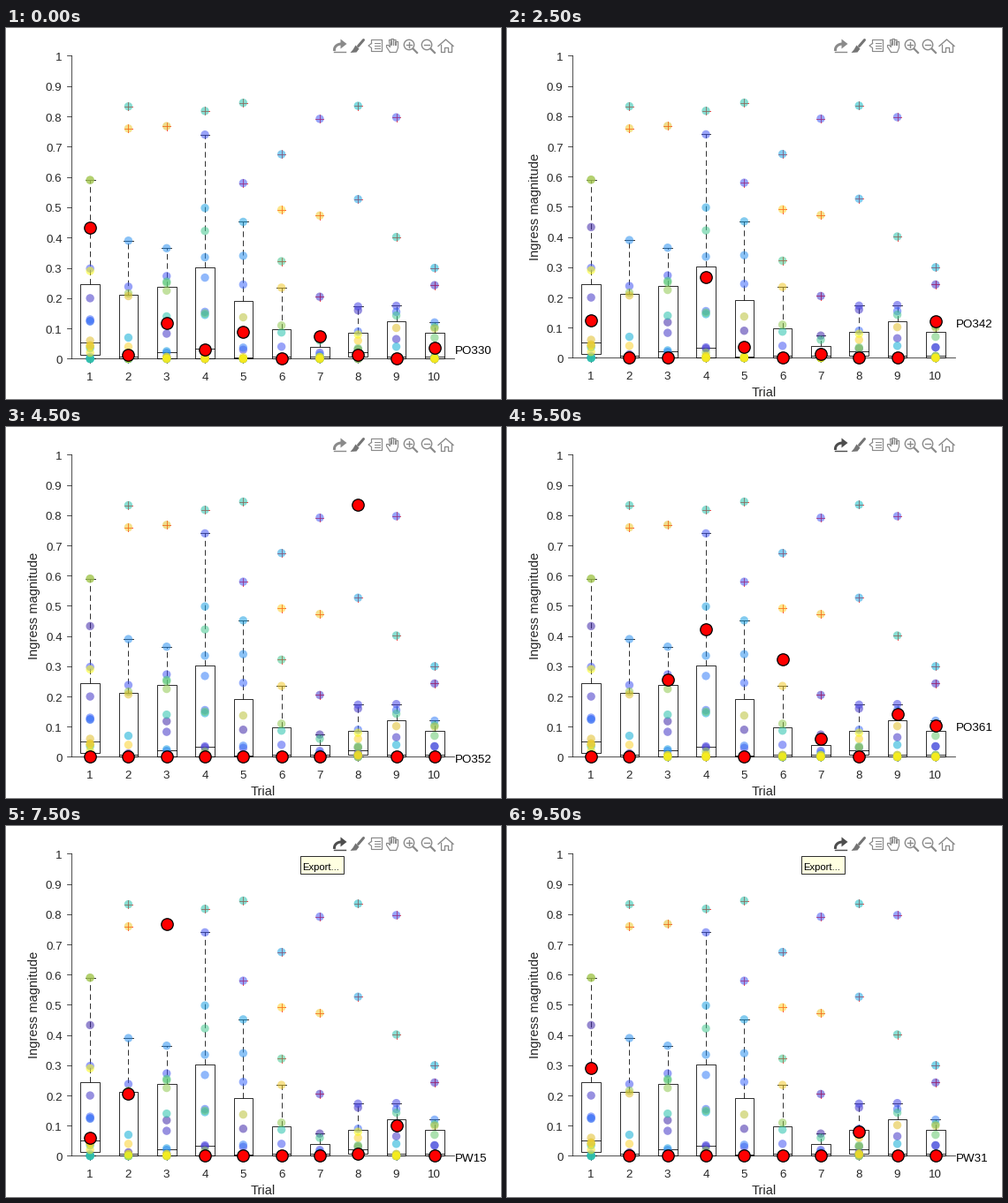
A matplotlib script for the animation above (10000 ms loop, 560 by 420 pixels).

```python
import numpy as np
import matplotlib.pyplot as plt
from matplotlib.animation import FuncAnimation
from matplotlib.colors import LinearSegmentedColormap
from matplotlib.patches import Circle, Polygon, Rectangle

plt.rcParams["font.family"] = "Liberation Sans"

W, H = 560, 420
LEFT, RIGHT, TOP = 73, 506, 31
STEP = (RIGHT - LEFT) / 10
INK = "#262626"
PARULA = LinearSegmentedColormap.from_list("parula", [
    "#3e26a8", "#4747eb", "#3e6fff", "#2797eb", "#08b5d0",
    "#31c69f", "#81cc59", "#dcbd29", "#fccf30", "#f9fb15"])

PEOPLE = ["PO330", "PO332", "PO336", "PO340", "PO341", "PO342", "PO344",
          "PO346", "PO349", "PO352", "PO358", "PO361", "PO368", "PO374",
          "PW12", "PW15", "PW18", "PW22", "PW27", "PW31"]
COUNT = len(PEOPLE)
COLORS = PARULA(np.linspace(0, 1, COUNT))

# Per trial: first participant of a run -> consecutive magnitudes.
RUNS = [
    {0: [.433, .2, .125, .298, .13, .123],
     10: [.035, 0, .59, .042, .59, .06, .045, .04, .02, .29]},
    {0: .012, 3: .238, 6: .39, 8: .07, 10: .833, 13: .216, 15: [.207, .76, .04]},
    {0: [.118, .083], 3: [.273, .02], 6: [.365, .025],
     10: [.14, .255, .25, .225], 15: .768},
    {0: .031, 2: [.035, .74, .155, .268, .335, .498, .145],
     10: [.818, .422, .15, .018]},
    {0: .09, 2: [.03, .58, .245, .037, .34, .452], 10: .845, 14: .137},
    {3: .04, 7: .675, 10: [.087, .322], 13: .11, 16: [.235, .492]},
    {0: [.074, .205, .02, .792], 5: .013, 11: .06, 16: .473},
    {0: [.012, .16, .173, .031, .09], 7: .527, 9: .835, 12: [.035, .031],
     15: .008, 17: .06, 19: .08},
    {1: [.065, .175, .797, .155], 8: .04, 10: [.402, .143], 15: .102},
    {0: [.035, .243], 3: .035, 5: .12, 8: .3, 11: [.105, .07], 14: .1},
]


def expand(runs):
    values = np.where(np.arange(COUNT) % 4 == 2, .006, 0)
    for start, run in runs.items():
        run = np.atleast_1d(run)
        values[start:start + len(run)] = run
    return values


DATA = [expand(runs) for runs in RUNS]
CENTERS = [LEFT + STEP * (i + .5) for i in range(10)]

fig = plt.figure(figsize=(W / 72, H / 72), dpi=72, facecolor="white")
ax = fig.add_axes([0, 0, 1, 1])


def line(xs, ys, color="black", width=.8, z=2, **kw):
    ax.plot(xs, ys, color=color, lw=width, zorder=z, **kw)


def text(x, y, s, size=13.33, color=INK, **kw):
    """Place text with its capitals centred on y."""
    ax.text(x, y + .36 * size, s, size=size, color=color, va="baseline", zorder=6, **kw)


def draw_axes(base):
    line([LEFT, LEFT], [TOP, base], INK)
    line([LEFT, RIGHT], [base, base], INK)
    for i in range(11):
        y = base + (TOP - base) * i / 10
        line([LEFT - 4.5, LEFT], [y, y], INK)
        text(63, y + .7, f"{i / 10:g}", ha="right")
    for i, x in enumerate(CENTERS, 1):
        line([x, x], [base, base + 4.5], INK)
        text(x, base + 19.5, str(i), ha="center")


def draw_box(x, values, to_y):
    q1, median, q3 = np.percentile(values, [25, 50, 75], method="hazen")
    reach = 1.5 * (q3 - q1)
    inside = values[(values >= q1 - reach) & (values <= q3 + reach)]
    half = STEP / 4
    ax.add_patch(Rectangle((x - half, to_y(q3)), 2 * half, to_y(q1) - to_y(q3),
                           fill=False, ec="black", lw=.8, zorder=2))
    line([x - half, x + half], [to_y(median)] * 2)
    for quartile, end in ((q1, inside.min()), (q3, inside.max())):
        line([x, x], [to_y(quartile), to_y(end)], ls=(0, (8, 5)), dash_capstyle="butt")
        line([x - half / 2, x + half / 2], [to_y(end)] * 2)
    for v in values[values > q3 + reach]:
        y = to_y(v)
        line([x - 4.5, x + 4.5], [y, y], "red")
        line([x, x], [y - 4.5, y + 4.5], "red")
    ax.scatter([x] * COUNT, to_y(values), s=9.4 ** 2, c=COLORS, alpha=.55,
               linewidths=0, zorder=3)


def draw_toolbar(hovered):
    gray = "#8a8a8a"
    export = "#4d4d4d" if hovered else gray

    def fill(points, color=gray):
        ax.add_patch(Polygon(points, fc=color, ec="none", zorder=4))

    # export
    t = np.linspace(0, np.pi / 2, 12)
    line(379 - 8 * np.cos(t), 24 - 6.5 * np.sin(t), export, 3)
    fill([(378, 12), (385, 17.5), (378, 23)], export)
    line([370, 383], [26.5, 26.5], export, 1.4)
    # brush
    line([404, 398], [13, 20], "#747474", 3, solid_capstyle="round")
    fill([(395, 19), (399, 23), (396, 27), (389, 27.5), (392, 24)], "#747474")
    # data tip
    line([413, 413, 425, 425, 413, 413, 409.5, 413],
         [17, 13, 13, 26, 26, 22, 19.5, 17], gray, 1.2)
    for y in (16.5, 19.5, 22.5):
        line([416, 422], [y, y], gray, 1)
    # pan
    line([434, 430, 430, 432, 434, 433, 433, 435, 435.5, 435.5, 438, 438, 438, 440.5,
          440.5, 440.5, 443, 443, 441, 434],
         [27, 21, 19, 19, 21, 14, 13, 13, 19, 12, 12, 19, 13, 13,
          19, 15, 15, 22, 27, 27], gray, 1.2)
    # zoom in and out
    for x, zoom_in in ((455.5, True), (475.5, False)):
        ax.add_patch(Circle((x, 18.5), 5.7, fill=False, ec=gray, lw=1.4, zorder=4))
        line([x + 4.5, x + 9], [23, 27.5], gray, 2.2)
        line([x - 3, x + 3], [18.5, 18.5], gray, 1.4)
        if zoom_in:
            line([x, x], [15.5, 21.5], gray, 1.4)
    # home
    line([488.5, 497, 505.5], [20, 12.5, 20], gray, 1.4)
    line([491, 491, 495, 495, 499, 499, 503, 503],
         [19, 27, 27, 21.5, 21.5, 27, 27, 19], gray, 1.3)


def draw_tooltip():
    ax.add_patch(Rectangle((332, 34), 49, 20, fc="#ffffe1", ec="#303030", lw=1, zorder=5))
    text(356, 45, "Export...", 11.3, "black", ha="center")


def draw(k):
    ax.clear()
    ax.set(xlim=(-.5, W - .5), ylim=(H - .5, -.5))
    ax.axis("off")
    base = 374 if k == 0 else 373

    def to_y(v):
        return base - (base - TOP) * v

    draw_axes(base)
    for x, values in zip(CENTERS, DATA):
        draw_box(x, values, to_y)
    if k > 0:
        text(290, 411.3, "Trial", 14.67, ha="center")
        ax.text(35.7, 202, "Ingress magnitude", size=14.67, color=INK, rotation=90,
                rotation_mode="anchor", ha="center", va="baseline")

    heights = [to_y(values[k]) for values in DATA]
    ax.scatter(CENTERS, heights, s=13.4 ** 2, c="red", edgecolors="black",
               linewidths=1.3, zorder=5)
    text(507, heights[-1] + 1.3, PEOPLE[k], color="black")

    draw_toolbar(hovered=k == 4 or k >= 11)
    if k >= 13:
        draw_tooltip()
    return []


anim = FuncAnimation(fig, draw, frames=COUNT, init_func=lambda: [], interval=500,
                     repeat=True, blit=False)
plt.show()
```
